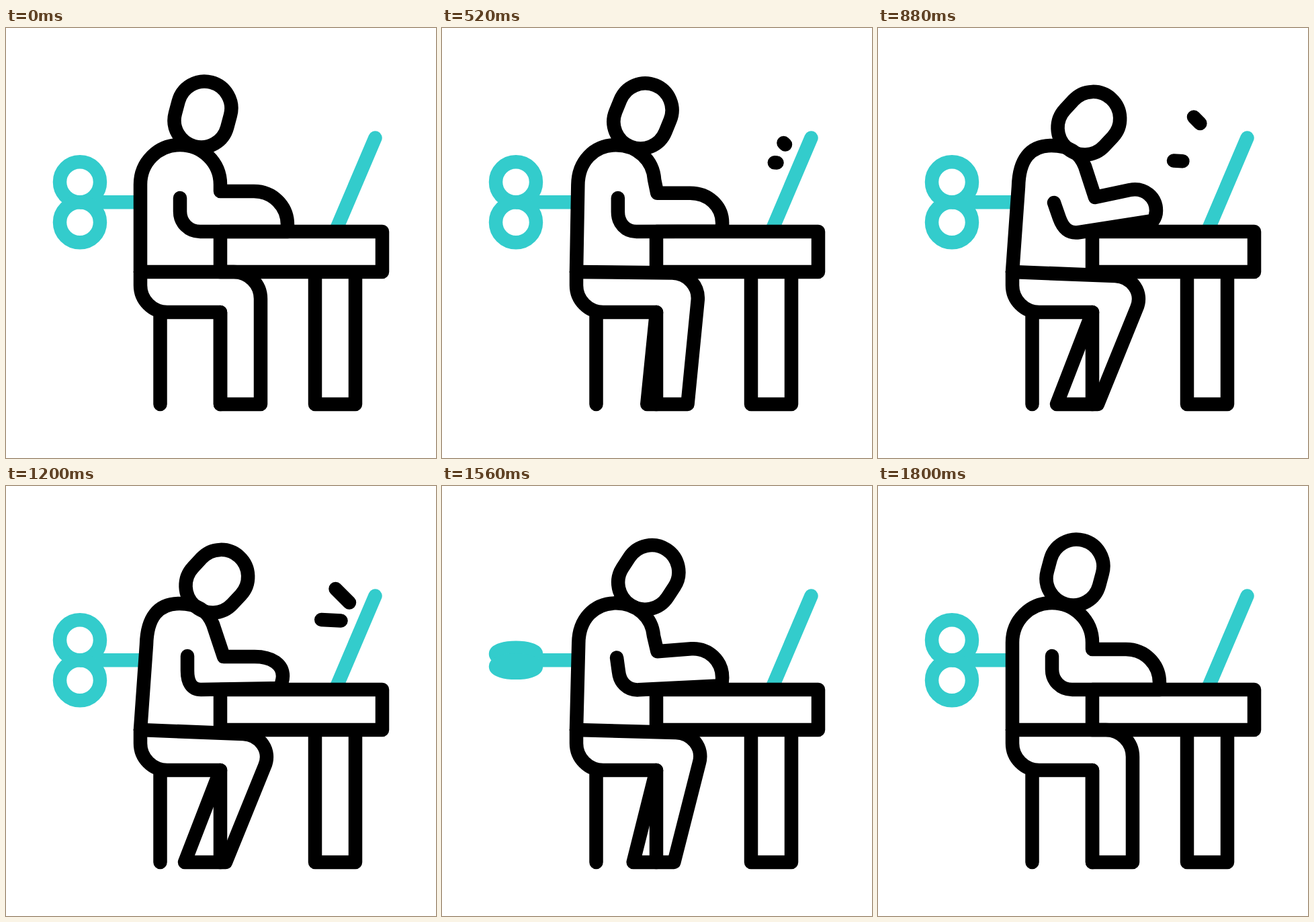
Write an HTML page that moves like this. It is 640 by 640 pixels and loops after 2000 ms.

```html
<!DOCTYPE html>
<html lang="en">
<head>
<meta charset="utf-8">
<title>Wind-up office worker</title>
<style>
  html, body { margin: 0; width: 100%; height: 100%; overflow: hidden; background: #fff; }
  svg { display: block; width: 100%; height: 100%; }
  g { fill: none; stroke-width: 20.5; stroke-linecap: round; stroke-linejoin: round; }
</style>
</head>
<body>
<svg viewBox="0 0 640 640">
  <g stroke="#33cccc">
    <path d="M110 259.3H204" stroke-linecap="butt"/>
    <ellipse class="ring" cx="110" rx="30"/>
    <ellipse class="ring" cx="110" rx="30"/>
    <path d="M549.5 163.5L491 301"/>
  </g>
  <g stroke="#000">
    <path id="desk" d="M319 303H560V363H319ZM460 363V560H520V363"/>
    <path id="chair" d="M229.5 423V560M200 363V383A40 40 0 0 0 240 423H319V560"/>
    <path id="legs"/>
    <path id="torso"/>
    <path id="head" d="M256.7 109.2A40 40 0 0 1 334 129.9L329.2 147.8A40 40 0 0 1 251.9 127.1Z"/>
    <path id="dashes"/>
  </g>
</svg>
<script>
const LOOP = 2000, STEP = 40;

const LEGS_REST = 'M200 363L339 363C361 363 379 381 379 403L379 560L319 560L319 423';
const LEGS_LEAN = 'M200 363L353 369C378 370 395 394 385 417L327 560L266 560L319 423';

const TORSO_REST = 'M200 363L200 233C200 200 226 174 259 174C292 174 319 200 319 233L319 243' +
  'L369 243C397 243 419 265 419 293C419 296 419 300 419 303L289 303C272 303 259 290 259 273L259 253';
const TORSO_LEAN = 'M200 363L209 236C210 196 226 175 258 175C288 175 301 188 308 206';
const ARM_DOWN = 'L324 254L370 254C395 254 412 265 412 283C412 290 409 295 409 301' +
  'L290 303C276 303 270 292 270 275L270 253';
const ARM_UP = 'L323 252L375 241C397 237 414 252 414 272C414 278 412 283 409 287' +
  'L300 304C281 307 274 294 270 283L262 260';

const $ = id => document.getElementById(id);
const rings = document.querySelectorAll('.ring');
const progress = (t, from, to) => Math.min(1, Math.max(0, (t - from) / (to - from)));
const ease = x => x * x * (3 - 2 * x);
const mix = (a, b, k) => a + (b - a) * k;

// Blend two paths that share the same commands.
function mixPath(a, b, k) {
  const ends = b.match(/[\d.]+/g);
  let i = 0;
  return a.replace(/[\d.]+/g, n => mix(+n, +ends[i++], k).toFixed(2));
}

// Forward lean, then return.
const lean = (t, back, rest) => ease(progress(t, 420, 720)) * (1 - ease(progress(t, back, rest)));

function drawKey(t) {
  const first = progress(t, 88, 438);
  const second = progress(t, 1400, 1800);
  const height = Math.max(0.01, Math.abs(Math.cos(Math.PI * (first + second))));
  rings.forEach((ring, i) => {
    ring.setAttribute('cy', 259.3 + (i ? 30 : -30) * height);
    ring.setAttribute('ry', 30 * height);
    ring.setAttribute('opacity', 1 - 0.13 * Math.sin(Math.PI * first));
  });
}

function drawWorker(t) {
  const bodyLean = lean(t, 1400, 1800);
  const torsoLean = lean(t, 1307, 1733);
  const raise = (1 - Math.cos(Math.PI * 5 * progress(t, 773, 1307))) / 2;
  const leaning = TORSO_LEAN + mixPath(ARM_DOWN, ARM_UP, raise);
  $('legs').setAttribute('d', mixPath(LEGS_REST, LEGS_LEAN, bodyLean));
  $('torso').setAttribute('d', mixPath(TORSO_REST, leaning, torsoLean));
  $('head').setAttribute('transform', `rotate(${28 * bodyLean} 277 177)`);
}

function drawDashes(t) {
  const age = t - (t < 1080 ? 505 : 1080);
  const tail = progress(age, 190, 430);
  const tip = progress(age, 0, 240);
  const dash = (x1, y1, x2, y2) =>
    `M${mix(x1, x2, tail)} ${mix(y1, y2, tail)}L${mix(x1, x2, tip)} ${mix(y1, y2, tip)}`;
  $('dashes').setAttribute('d', tip > tail
    ? dash(511, 173.5, 470, 132.5) + dash(498.5, 200.5, 440, 197.5)
    : '');
}

function frame() {
  const t = Math.floor(performance.now() % LOOP / STEP) * STEP;
  drawKey(t);
  drawWorker(t);
  drawDashes(t);
  requestAnimationFrame(frame);
}
frame();
</script>
</body>
</html>
```
